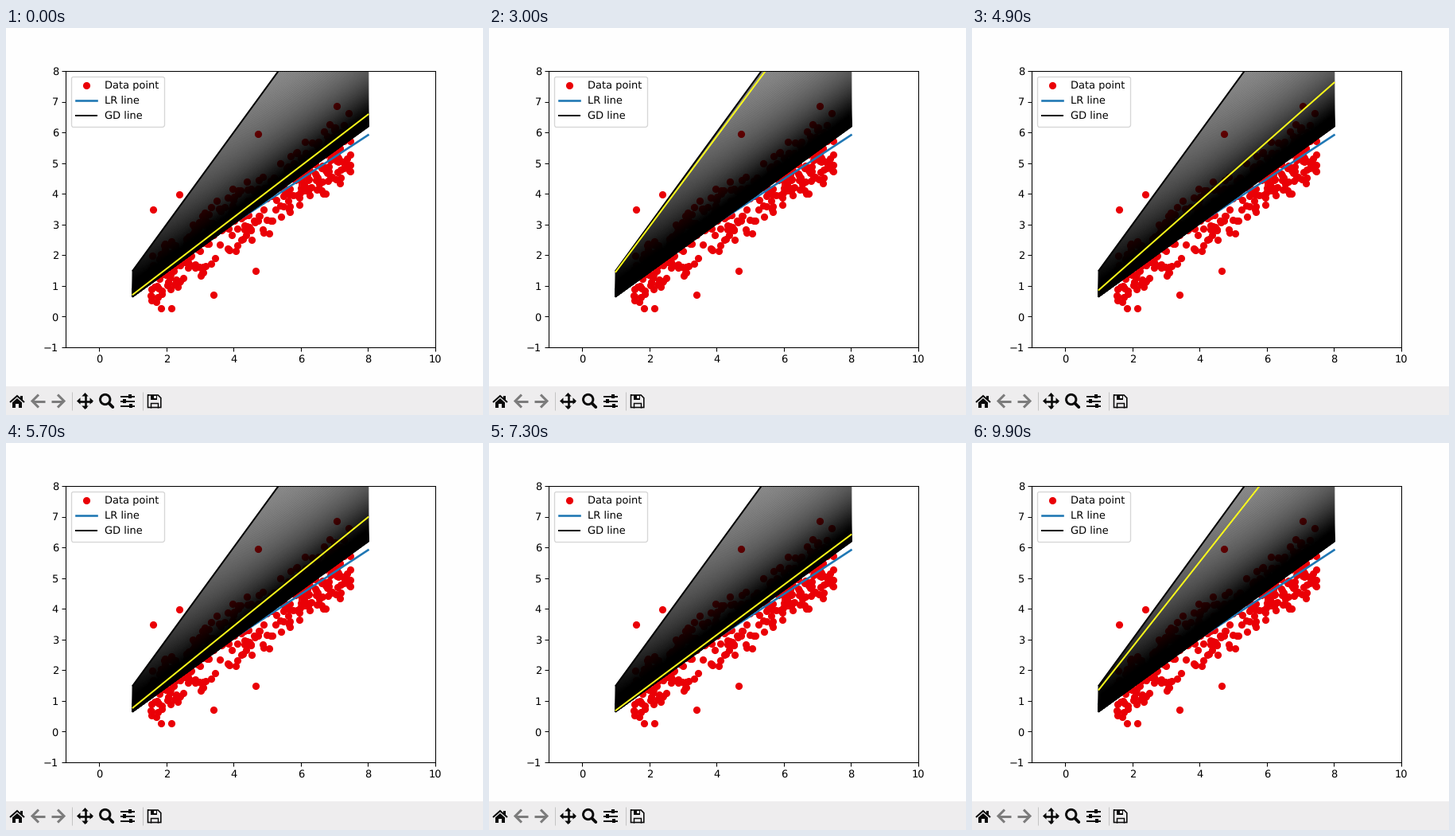
A matplotlib script for the animation above (10000 ms loop, 600 px wide and 486 px high).

```python
import matplotlib.pyplot as plt
import numpy as np
from matplotlib.animation import FuncAnimation
from matplotlib.collections import LineCollection
from matplotlib.patches import Circle, Polygon, Rectangle

W, H, DPI = 600, 486, 93.75
TOOLBAR = 36
FRAMES, STEP = 100, 0.1

# Gradient descent: the line decays from START to END at x = 1 and x = 8
XS = np.array([1.0, 8.0])
START = np.array([1.5, 12.0])
END = np.array([0.655, 6.14])
RATE, PERIOD, RESTART = 0.70, 6.72, 2.935
STEPS = 320

plt.rcParams["font.family"] = "DejaVu Sans"
plt.rcParams["text.hinting"] = "none"
fig = plt.figure(figsize=(W / DPI, H / DPI), dpi=DPI, facecolor="#fefefe")


def gd_line(elapsed):
    return END + (START - END) * np.exp(-RATE * elapsed)


def lr_line(x):
    return 0.17 + 0.718 * x


def make_points(n=370):
    rng = np.random.default_rng(12)
    x = rng.uniform(1.52, 7.5, n)
    y = lr_line(x) - 1.15 + 2.5 * rng.beta(2, 2.2, n)
    outliers = [(1.61, 3.48), (2.38, 3.97), (4.72, 5.95), (7.06, 6.87),
                (4.65, 1.5), (3.4, 0.7), (1.83, 0.27), (2.15, 0.27)]
    return np.vstack([np.column_stack([x, y]), outliers]).T


def draw_plot():
    ax = fig.add_axes([75 / W, 85 / H, 465 / W, 347 / H])
    ax.set(xlim=(-1, 10), ylim=(-1, 8),
           xticks=range(0, 11, 2), yticks=range(-1, 9))
    ax.plot(*make_points(), "o", color="#ea0006", ms=6, label="Data point")
    ax.plot(XS, lr_line(XS), color="#1f77b4", lw=2, label="LR line")

    fan = [np.column_stack([XS, gd_line(t)])
           for t in np.linspace(0, PERIOD, STEPS)]
    ax.add_collection(LineCollection(fan, colors="black", linewidths=1.5,
                                     alpha=0.35, capstyle="projecting",
                                     zorder=2.1), autolim=False)
    ax.plot(XS, START, color="black", lw=1.5, zorder=2.2, label="GD line")
    ax.plot(XS, gd_line(PERIOD), color="black", lw=1.5, zorder=2.2)
    ax.legend(loc="upper left", borderpad=0.47)
    return ax.plot(XS, START, color="#ffff1a", lw=1.5, zorder=2.3)[0]


def draw_toolbar():
    ax = fig.add_axes([0, 0, 1, 1], zorder=5)
    ax.set(xlim=(0, W), ylim=(H, 0))
    ax.axis("off")
    ink, dim, bg = "#0a0a0a", "#7c7c7c", "#eeedee"
    mid = 468.5

    def box(x, y, w, h, color=ink):
        ax.add_patch(Rectangle((x, y), w, h, fc=color, ec="none"))

    def poly(*points):
        ax.add_patch(Polygon(points, fc=ink, ec="none"))

    def stroke(xs, ys, px, color=ink, cap="butt"):
        ax.plot(xs, ys, color=color, lw=px * 72 / DPI,
                solid_capstyle=cap, solid_joinstyle="miter")

    box(0, H - TOOLBAR, W, TOOLBAR, bg)
    for x in (82.5, 171.5):
        stroke([x, x], [457, 480], 1, "#c4c4c4")

    # Home
    stroke([5, 14, 23], [470, 462, 470], 2)
    box(18.3, 461.5, 2.5, 5)
    poly((7.8, 470.5), (14, 465), (20.2, 470.5))
    box(7.8, 470.3, 12.4, 6.2)
    box(12.3, 471.8, 3.4, 4.7, bg)

    # Back and forward
    for x, d in ((40, 1), (66, -1)):
        stroke([x - 6 * d, x + 9 * d], [mid, mid], 3, dim)
        stroke([x + d, x - 7 * d, x + d], [mid - 8, mid, mid + 8], 3, dim)

    # Pan
    cx = 99.5
    stroke([cx - 8, cx + 8], [mid, mid], 2.6)
    stroke([cx, cx], [mid - 8, mid + 8], 2.6)
    for dx, dy in ((1, 0), (-1, 0), (0, 1), (0, -1)):
        poly((cx + 10.5 * dx, mid + 10.5 * dy),
             (cx + 6 * dx + 4.2 * dy, mid + 6 * dy + 4.2 * dx),
             (cx + 6 * dx - 4.2 * dy, mid + 6 * dy - 4.2 * dx))

    # Zoom
    ax.add_patch(Circle((124.7, 466.5), 6.2, fc="none", ec=ink,
                        lw=2.9 * 72 / DPI))
    stroke([129.5, 134.3], [471.3, 476.1], 3.8, cap="round")

    # Subplot sliders
    for y, knob in ((mid - 6, 156), (mid, 149), (mid + 6, 157)):
        stroke([144, 162], [y, y], 1.9)
        box(knob - 3, y - 2.8, 6, 5.6, bg)
        box(knob - 2, y - 2.5, 4, 5)

    # Save
    stroke([178.5, 191.2, 194.8, 194.8, 178.5, 178.5],
           [461, 461, 464.6, 476.5, 476.5, 460.2], 1.6)
    box(181.5, 461, 8.5, 5.5)
    box(186.3, 462, 2.3, 3.2, bg)
    stroke([182.2, 182.2, 191.3, 191.3], [476.5, 470.5, 470.5, 476.5], 1.5)


draw_toolbar()
line = draw_plot()


def update(i):
    # The opening pose is held for two steps
    t = i * STEP if i > 1 else -STEP
    line.set_ydata(gd_line((t - RESTART) % PERIOD))
    return (line,)


anim = FuncAnimation(fig, update, frames=FRAMES, interval=1000 * STEP,
                     repeat=True)
plt.show()
```
